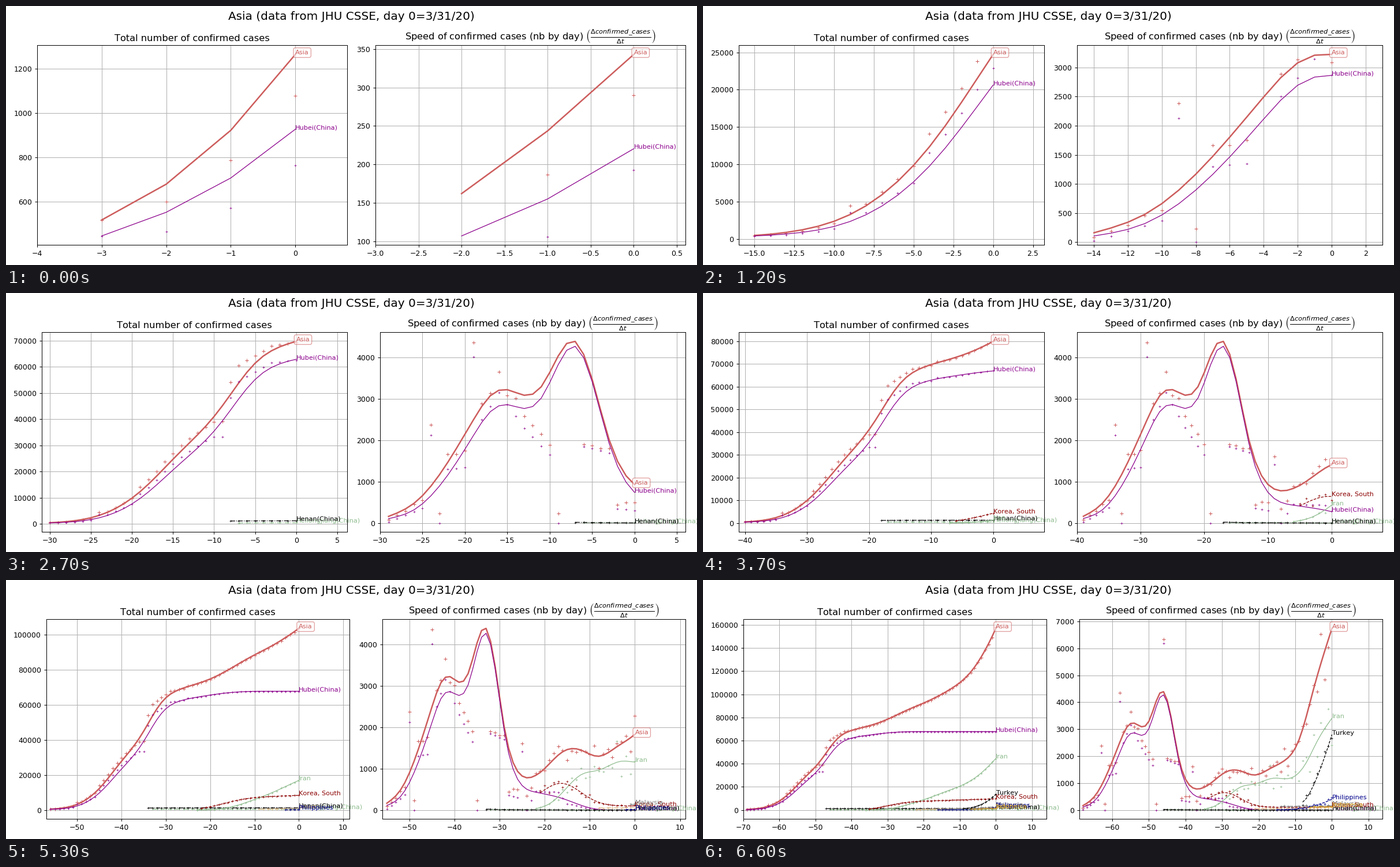
A matplotlib script that plays this animation: 1197 by 450 pixels, repeating every 9.6 s.

```python
import numpy as np
import matplotlib.pyplot as plt
from matplotlib.animation import FuncAnimation

W, H, DPI = 1197, 450, 90
FIRST, LAST = 3, 69            # first and last day at the right end
STEPS, HOLD = 67, 29           # growing frames, then still frames
DIGIT = 7.95                   # width of one tick label digit in pixels
DAYS = np.arange(LAST + 1)
rng = np.random.default_rng(4)


def spline(knots):
    """Natural cubic spline through (day, value) pairs, never below zero."""
    k, v = np.array(knots, float).T
    h = np.diff(k)
    slope = np.diff(v) / h
    m, rhs = np.eye(len(k)), np.zeros(len(k))
    for i in range(1, len(k) - 1):
        m[i, i - 1:i + 2] = h[i - 1], 2 * (h[i - 1] + h[i]), h[i]
        rhs[i] = 6 * (slope[i] - slope[i - 1])
    c = np.linalg.solve(m, rhs)
    i = np.clip(np.searchsorted(k, DAYS, side="right") - 1, 0, len(h) - 1)
    a, b = k[i + 1] - DAYS, DAYS - k[i]
    y = ((c[i] * a**3 + c[i + 1] * b**3) / (6 * h[i])
         + (v[i] / h[i] - c[i] * h[i] / 6) * a
         + (v[i + 1] / h[i] - c[i + 1] * h[i] / 6) * b)
    return np.maximum(y, 0)


def scatter(y, amount):
    """Daily noise that cancels out in the running total."""
    return y * (1 + amount * np.diff(rng.normal(size=len(y) + 1)))


def fade(start, speed, days):
    return speed * np.exp(-(DAYS - start) / days)


def ramp(start, low, high, power=1):
    t = np.clip((DAYS - start) / (LAST - start), 0, 1)
    return low + (high - low) * t**power


# Smoothed cases per day
hubei = spline([
    (1, 107), (4, 320), (8, 1165), (11, 2115), (13, 2695), (15, 2865),
    (17, 2770), (19, 3020), (21, 3830), (23, 4275), (25, 3420), (27, 1930),
    (29, 990), (31, 590), (34, 430), (40, 275), (46, 50), (52, 0), (69, 0)])
elsewhere = spline([
    (1, 55), (5, 195), (9, 340), (13, 385), (17, 320), (21, 210), (25, 60),
    (28, 120), (31, 230), (35, 500), (40, 1135), (44, 1335), (48, 1285),
    (52, 1530), (56, 1830), (60, 2600), (64, 4500), (69, 6745)])
iran = spline([
    (34, 30), (37, 145), (40, 430), (44, 850), (48, 965), (53, 1180),
    (58, 1195), (62, 1760), (65, 2560), (69, 3410)])
korea = 97 + 548 * np.exp(-((DAYS - 39.6) / 6.2)**2) + ramp(60, 0, 20)

# Reported cases per day: a broken line with sudden spikes
spikes = np.array([
    (1, 20), (5, 365), (6, 2131), (7, 0), (8, 1300), (10, 1350), (11, 4024),
    (12, 2500), (14, 3150), (17, 2300), (20, 1650), (21, 0), (22, 14840),
    (23, 6200), (24, 1850), (27, 1700), (28, 350), (30, 300), (31, 1420),
    (32, 0), (34, 450), (39, 430), (41, 150), (46, 30), (50, 0)])
hubei_raw = np.interp(DAYS, *spikes.T)
asia_raw = hubei_raw + scatter(elsewhere, .09)

# name, colour, line style, first day, first total, smoothed speed
SERIES = [
    ("Asia", "indianred", "-", 0, 516, hubei + elsewhere),
    ("Hubei(China)", "darkmagenta", "-", 0, 444, hubei),
    ("Heilongjiang(China)", "darkseagreen", "-.", 23, 425, fade(24, 13, 5)),
    ("Henan(China)", "black", "-.", 22, 1169, fade(23, 20, 5)),
    ("Iran", "darkseagreen", "-", 33, 61, iran),
    ("Korea, South", "darkred", "--", 34, 977, korea),
    ("Japan", "burlywood", "-.", 47, 511, ramp(48, 50, 100, 2)),
    ("Malaysia", "gray", "-.", 54, 566, ramp(55, 130, 155)),
    ("Philippines", "darkblue", "--", 53, 140, ramp(54, 10, 400, 2.5)),
    ("Indonesia", "goldenrod", "--", 62, 686, ramp(63, 105, 125)),
    ("Turkey", "black", "--", 60, 1236, ramp(61, 290, 2800, 1.4)),
]
REPORTED = {"Asia": asia_raw, "Hubei(China)": hubei_raw}

plt.rcParams["font.family"] = "DejaVu Sans"
plt.rcParams["text.kerning_factor"] = 6
fig = plt.figure(figsize=(W / DPI, H / DPI), dpi=DPI, facecolor="white")
fig.suptitle("Asia (data from JHU CSSE, day 0=3/31/20)", fontsize=16)
axes = [fig.add_axes([.05, .08, .44, .77]), fig.add_axes([.54, .08, .44, .77])]
axes[0].set_title("Total number of confirmed cases", fontsize=13)
axes[1].set_title("Speed of confirmed cases (nb by day) "
                  r"$\left(\frac{\Delta confirmed\_cases}{\Delta t}\right)$",
                  fontsize=13)
for ax in axes:
    ax.grid(True)
    ax.set_axisbelow(True)


class Trace:
    """Smoothed line, raw crosses and end label in one panel."""

    def __init__(self, ax, name, color, style, start, first, fit, raw):
        main = name == "Asia"
        self.start, self.first, self.fit, self.raw = start, first, fit, raw
        self.line, = ax.plot([], [], style, color=color, lw=2 if main else 1)
        self.dots, = ax.plot([], [], "+", color=color, ms=5 if main else 2.5,
                             mew=.8 if main else .6)
        box = dict(boxstyle="round", fc="white", ec=color, alpha=.6)
        self.label = ax.text(0, 0, name, color=color, fontsize=9,
                             bbox=box if main else None)

    def show(self, day):
        """Draw up to the given day; return the visible line values."""
        count = day - self.first + 1 if day > self.start else 0
        x = np.arange(self.first, self.first + count) - day
        y = self.fit[:count]
        self.line.set_data(x, y)
        self.dots.set_data(x, self.raw[:count])
        self.label.set_visible(count > 0)
        if count:
            self.label.set_position((0, y[-1]))
        return y


def running(base, daily):
    return base + np.concatenate([[0], np.cumsum(daily)])


panels = [[], []]
for name, color, style, start, base, speed in SERIES:
    raw = REPORTED[name] if name in REPORTED else scatter(speed, .12)
    fit, raw = speed[start + 1:], raw[start + 1:]
    look = name, color, style, start
    panels[0].append(Trace(axes[0], *look, start,
                           running(base, fit), running(base, raw)))
    panels[1].append(Trace(axes[1], *look, start + 1, fit, raw))


def inside(ticks, lim):
    return [t for t in ticks if lim[0] - 1e-9 <= t <= lim[1] + 1e-9]


def y_width(ax):
    top = inside(ax.get_yticks(), ax.get_ylim())[-1]
    return DIGIT * len(f"{top:.0f}") + 22


def overhang(ax):
    """How far the last x tick label reaches past the right spine."""
    lim = ax.get_xlim()
    ticks = inside(ax.get_xticks(), lim)
    decimal = any(t % 1 for t in ticks)
    width = DIGIT * len(f"{ticks[-1]:.{int(decimal)}f}") - 4 * decimal
    return width / 2 - (lim[1] - ticks[-1]) * 527 / (lim[1] - lim[0])


def layout():
    left = y_width(axes[0])
    right = W - 13.5 - max(6.5, overhang(axes[1]))
    gap = y_width(axes[1]) + max(3.3, overhang(axes[0]) + .5)
    width = (right - left - gap) / 2
    for ax, x in zip(axes, (left, left + width + gap)):
        ax.set_position([x / W, 34.7 / H, width / W, 347 / H])


def update(i):
    day = FIRST + min(i, STEPS - 1)
    for ax, traces, span in zip(axes, panels, (day + 1, day)):
        shown = np.concatenate([t.show(day) for t in traces])
        low, high = shown.min(), shown.max()
        pad = .05 * (high - low)
        ax.set_xlim(-span, .2 * span)
        ax.set_ylim(low - pad, high + pad)
    layout()
    return []


anim = FuncAnimation(fig, update, frames=STEPS + HOLD, interval=100,
                     init_func=lambda: update(0), repeat=True, repeat_delay=0)
plt.show()
```
